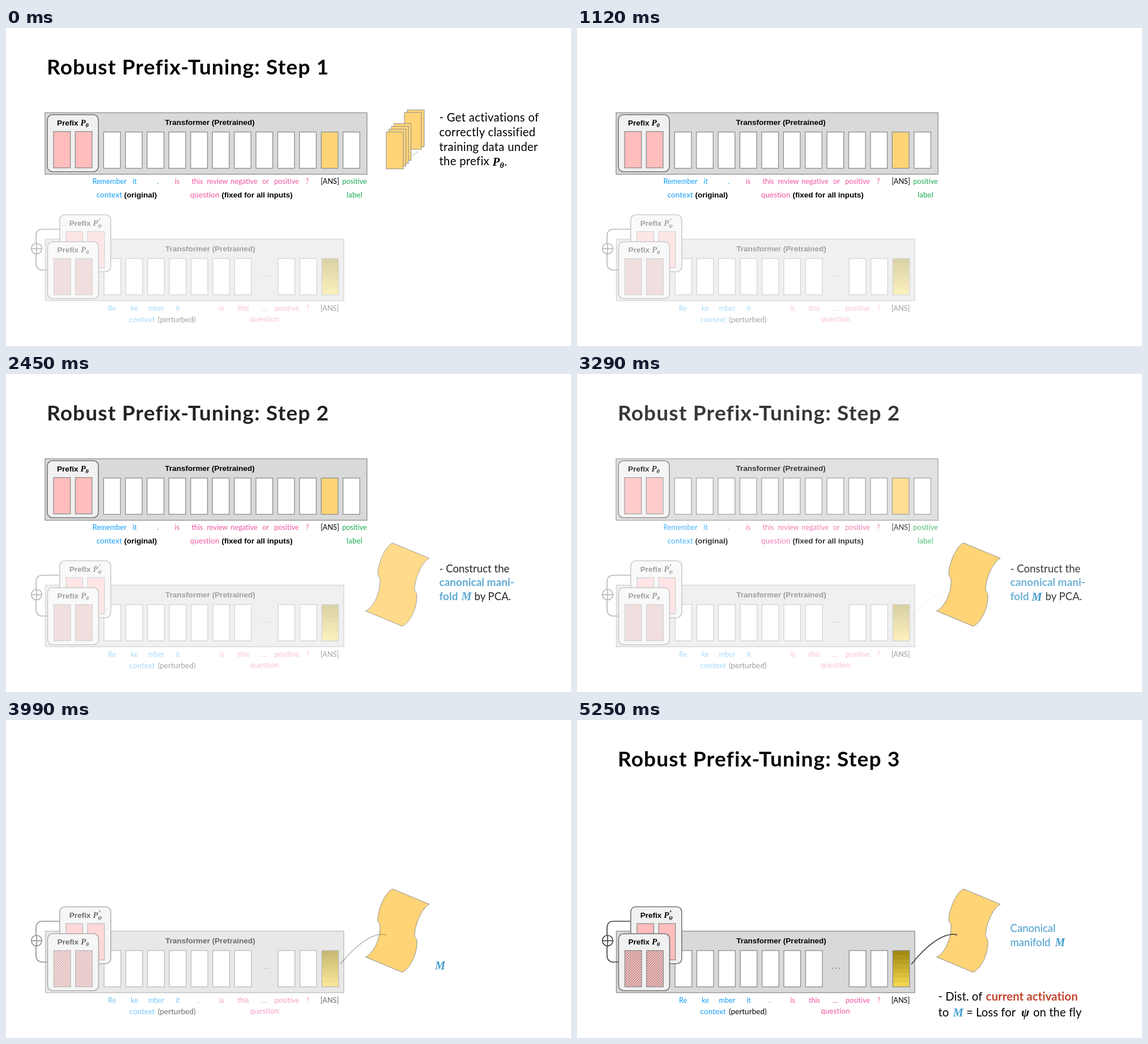
An HTML page for the animation above (5810 ms loop, 997 px wide and 561 px high).

```html
<!DOCTYPE html>
<html lang="en">
<head>
<meta charset="utf-8">
<title>Robust Prefix-Tuning</title>
<style>
html, body { margin: 0; width: 100%; height: 100%; overflow: hidden; background: #fff; }
svg { display: block; width: 100vw; height: 100vh; }
text { font-family: Lato, sans-serif; font-variant-ligatures: none; white-space: pre; }
.title { font-size: 37px; font-weight: 700; letter-spacing: 1.15px; }
.note { font-size: 20.3px; letter-spacing: .3px; }
.small { font-size: 18.6px; letter-spacing: 0; }
.loss { font-size: 20.2px; letter-spacing: .1px; }
.tok { font-size: 12.7px; }
.cap { font-size: 13.4px; letter-spacing: .1px; }
.arial { font: 700 13.5px "Liberation Sans", Arial, sans-serif; }
.math { font-family: "Liberation Serif", serif; font-weight: 700; font-style: italic; }
.mid { text-anchor: middle; }
.key { font-size: 19px; font-weight: 700; }
.alert { font-size: 20.6px; font-weight: 700; }
</style>
</head>
<body>
<svg id="stage" viewBox="0 0 997 561" xmlns="http://www.w3.org/2000/svg">
  <defs>
    <pattern id="hatch" width="3.2" height="3.2" patternUnits="userSpaceOnUse" patternTransform="rotate(45)">
      <rect width="3.2" height="3.2" fill="#f9c3c3"/>
      <rect width="1" height="3.2" fill="#9a7373"/>
    </pattern>
  </defs>
</svg>
<script>
const LOOP = 5810, TICK = 70;
const BLUE = '#139cf4', PINK = '#ee559f', GREEN = '#1cab54', SKY = '#459dcd', RED = '#c2462f';
const PINK_FILL = '#ffbdbd', GOLD = '#ffd477';
const stage = document.getElementById('stage');

const text = (x, y, str, cls, fill = '#000', extra = '') =>
  `<text x="${x}" y="${y}" class="${cls}" fill="${fill}" ${extra}>${str}</text>`;
const rect = (x, y, w, h, fill, stroke = '#8c8c8c', sw = 1.3, rx = 0) =>
  `<rect x="${x}" y="${y}" width="${w}" height="${h}" rx="${rx}" fill="${fill}" stroke="${stroke}" stroke-width="${sw}"/>`;
const math = (x, y, str, size, fill = '#000') =>
  text(x, y, str, 'math', fill, `font-size="${size}"`);
const cell = (x, y, fill = '#fff') => rect(x, y, 29.6, 64, fill);
const dot = (x, y, r = 0.9) => `<circle cx="${x}" cy="${y}" r="${r}" fill="#777"/>`;
const title = step => text(72, 82, `Robust Prefix-Tuning: Step ${step}`, 'title');
const tokens = (y, list) =>
  list.map(([x, str, fill]) => text(x, y, str, 'tok mid', fill)).join('');

// Box with two cells: one soft prompt
function prefix(x, y, sub, fill, prime = '') {
  return rect(x, y, 90, 100.5, '#f1f1f1', '#737373', 1.6, 9) +
    cell(x + 11, y + 29.7, fill) + cell(x + 49.3, y + 29.7, fill) +
    text(x + 17, y + 19, 'Prefix', 'arial') +
    math(x + 58.5, y + 19, 'P', 15) +
    math(x + 67.5, y + 22, sub, 10) +
    (prime && math(x + 68.5, y + 16, prime, 14));
}

function cleanModel() {
  let s = rect(69, 149.5, 568, 108.5, '#d9d9d9', '#999', 1.5);
  for (let i = 0; i < 12; i++) s += cell(172.3 + i * 38.4, 183.5, i === 10 ? GOLD : '#fff');
  return s + prefix(73, 153, 'θ', PINK_FILL) +
    text(359.7, 171, 'Transformer (Pretrained)', 'arial mid') +
    tokens(275, [
      [182.5, 'Remember', BLUE], [227, 'it', BLUE], [268, '.', BLUE],
      [302, 'is', PINK], [337.5, 'this', PINK], [373, 'review', PINK],
      [420, 'negative', PINK], [458, 'or', PINK], [495, 'positive', PINK],
      [531.5, '?', PINK], [571.5, '[ANS]', '#000'], [615, 'positive', GREEN]
    ]) +
    text(182.3, 298.5, 'context', 'cap mid', BLUE) + text(208.5, 298.5, '(original)', 'arial') +
    text(350.7, 298.5, 'question', 'cap mid', PINK) + text(380.5, 298.5, '(fixed for all inputs)', 'arial') +
    text(615, 298.5, 'label', 'cap mid', GREEN);
}

// Banded fill for the perturbed activation
function bands(x, y, n) {
  let s = '';
  for (let i = 0; i < n; i++) {
    const k = i / (n - 1);
    const rgb = [160 + 82 * k, 138 + 74 * k, 16 + 62 * k].map(Math.round);
    s += `<rect x="${x}" y="${y + i * 64 / n}" width="29.6" height="${64 / n + .3}" fill="rgb(${rgb})"/>`;
  }
  return s + cell(x, y, 'none');
}

function testModel() {
  let s = rect(69.5, 372.5, 526.5, 108.5, '#d9d9d9', '#999', 1.5);
  for (let i = 0; i < 10; i++) if (i !== 7) s += cell(173 + i * 38.4, 406.7);
  s += bands(557.2, 406.7, 8) + dot(451, 438) + dot(457, 438) + dot(463, 438);
  return s +
    '<g fill="none" stroke="#454545" stroke-width="1.7">' +
    '<path d="M95 355H65Q53 355 53 367V415Q53 427 65 427H73"/>' +
    '<circle cx="54" cy="389.3" r="9.3" fill="#fff"/><path d="M44.7 389.3H63.3M54 380V398.6"/></g>' +
    prefix(94.8, 329.5, 'ψ', PINK_FILL, '′') + prefix(73.4, 377, 'θ', 'url(#hatch)') +
    text(360.5, 394, 'Transformer (Pretrained)', 'arial mid') +
    tokens(498.5, [
      [187, 'Re', BLUE], [226.5, 'ke', BLUE], [265, 'mber', BLUE], [303, 'it', BLUE],
      [340, '.', BLUE], [380.5, 'is', PINK], [419, 'this', PINK], [455.5, '…', PINK],
      [495.5, 'positive', PINK], [532.5, '?', PINK], [571, '[ANS]', '#000']
    ]) +
    text(240.2, 519, 'context', 'cap mid', BLUE) + text(301.3, 519, '(perturbed)', 'cap mid') +
    text(456, 518, 'question', 'cap mid', PINK);
}

function stepOne() {
  const card = (x, y) => rect(x, y, 30, 65, GOLD, '#8f8f8f', 1);
  let s = title(1) + card(708, 144.5) + card(703, 149);
  for (let i = 3; i >= 0; i--) s += card(671 + i * 4.6, 183.5 - i * 5);
  s += dot(718.5, 224, .8) + dot(721.5, 221.5, .8) + dot(724.5, 219, .8);
  ['- Get activations of', 'correctly classified', 'training data under', 'the prefix']
    .forEach((line, i) => s += text(764.5, 165 + i * 25.8, line, 'note'));
  return s + math(858.5, 242.5, 'P', 21) + math(871.5, 246.5, 'θ', 14) + text(879.5, 242.5, '.', 'note');
}

const stepTwo = () => title(2) +
  text(764.5, 350, '- Construct the', 'small') +
  text(764.5, 373.5, 'canonical mani-', 'key', SKY) +
  text(764.5, 399, 'fold', 'key', SKY) +
  text(826.5, 399, 'by PCA.', 'small');

const stepThree = () => title(3) +
  text(764.5, 373.5, 'Canonical', 'small', SKY) +
  text(764.5, 399, 'manifold', 'small', SKY) +
  math(843.5, 399, 'M', 20, SKY) +
  text(637.5, 495, '- Dist. of', 'loss') +
  text(721.5, 495, 'current activation', 'alert', RED) +
  text(637.5, 522.5, 'to', 'loss') + text(687, 522.5, '= Loss for', 'loss') +
  math(784, 522.5, 'ψ', 21) + text(805, 522.5, 'on the fly', 'loss');

const sheet = () => `<path fill="${GOLD}" stroke="#8f8f8f" d="M682 298L747 325
  c-14 7 -26 38 -26 55c0 5 4 4 4 11c1 18 -10 47 -26 54L634.5 418
  c16 -7 26.5 -36 25.5 -54c0 -7 -4 -6 -4 -11c0 -17 12 -48 26 -55z"/>`;

const link = () => '<path d="M590 431C612 403 645 373 671 379" fill="none" stroke="#4a4a4a" stroke-width="1.8"/>';

function layer(markup) {
  const g = document.createElementNS('http://www.w3.org/2000/svg', 'g');
  g.innerHTML = markup;
  return stage.appendChild(g);
}

const parts = {
  test: layer(testModel()), clean: layer(cleanModel()), one: layer(stepOne()),
  sheet: layer(sheet()), link: layer(link()), two: layer(stepTwo()),
  three: layer(stepThree()), symbol: layer(text(0, 0, 'M', 'math mid', SKY, 'font-size="20.5"'))
};

const ramp = (t, from, to) => Math.min(1, Math.max(0, (t - from) / (to - from)));
const mix = (a, b, k) => a + (b - a) * k;

// cubic-bezier(.42, 0, .58, 1)
function easeInOut(x) {
  let lo = 0, hi = 1;
  for (let i = 0; i < 24; i++) {
    const u = (lo + hi) / 2;
    const bx = 1.26 * u * (1 - u) ** 2 + 1.74 * u * u * (1 - u) + u ** 3;
    if (bx < x) lo = u; else hi = u;
  }
  return lo * lo * (3 - 2 * lo);
}

function render(ms) {
  const t = Math.floor((ms % LOOP) / TICK) * TICK;
  const enter = 1 - (1 - ramp(t, 2040, 2660)) ** 1.8;
  const leave = 1 - ramp(t, 3150, 3790);
  const move = ramp(t, 3150, 5250);
  const ease = easeInOut(move);
  const alpha = {
    one: 1 - ramp(t, 500, 1120) ** 1.4,
    clean: leave,
    test: mix(.37, 1, ease),
    sheet: enter,
    symbol: enter,
    two: enter * leave,
    link: move ** 1.2,
    three: ramp(t, 4610, 5250)
  };
  for (const key in alpha) parts[key].setAttribute('opacity', alpha[key].toFixed(3));
  parts.symbol.setAttribute('transform',
    `translate(${mix(812.5, 672.5, ease)} ${mix(399, 522.5, ease)})`);
}

const start = performance.now();
function loop() {
  render(performance.now() - start);
  requestAnimationFrame(loop);
}
loop();
</script>
</body>
</html>
```
